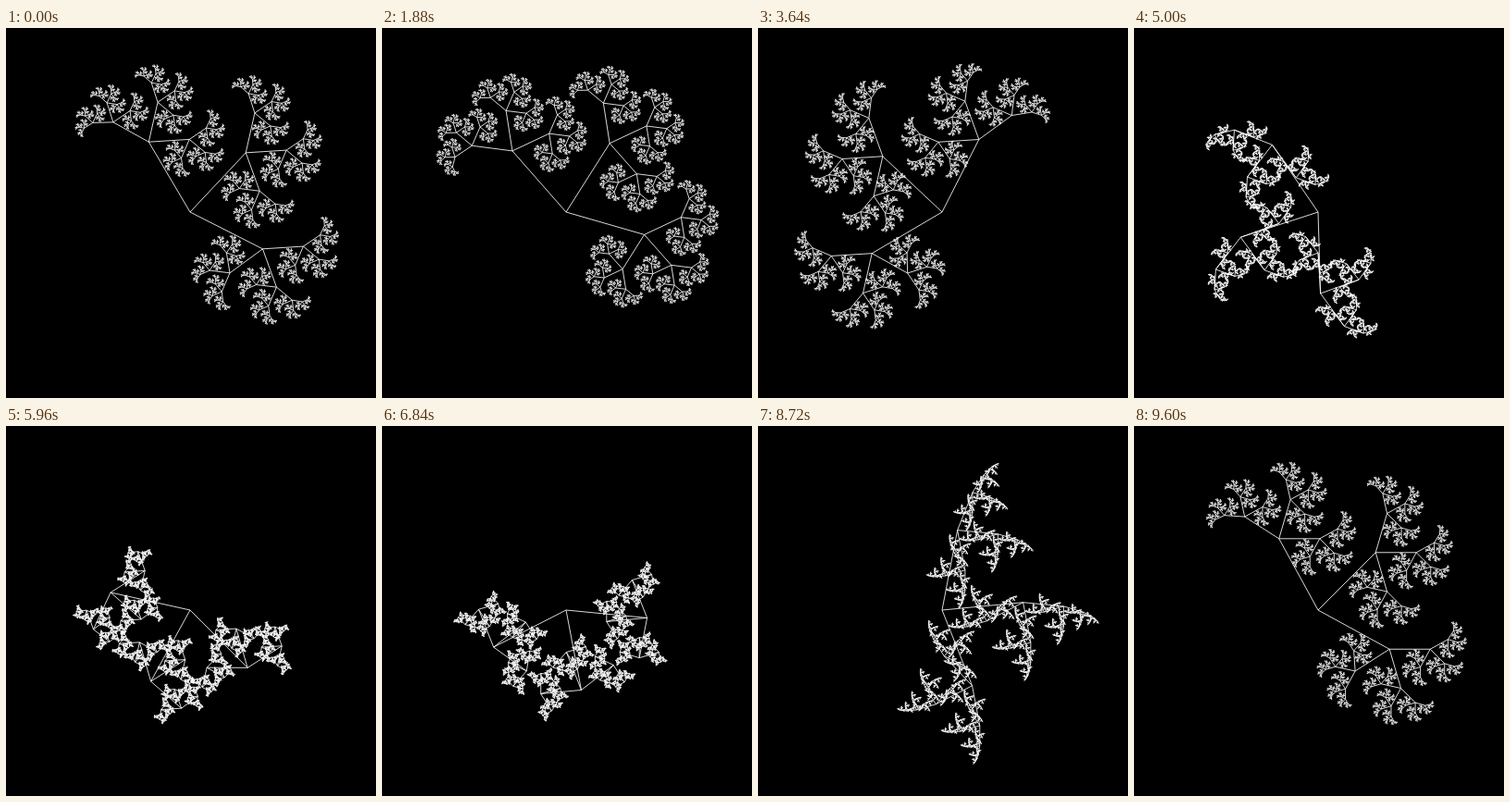
Recreate the animation shown at these times as an HTML page with a canvas. Size 400 by 400 pixels, loop 9.68 s.

```html
<!DOCTYPE html>
<html lang="en">
<head>
<meta charset="utf-8">
<title>Turning fractal tree</title>
<style>
  html, body { margin: 0; width: 100%; height: 100%; overflow: hidden; background: #000; }
  canvas { display: block; }
</style>
</head>
<body>
<canvas id="stage" width="400" height="400"></canvas>
<script>
const ctx = document.getElementById('stage').getContext('2d');
const RAD = Math.PI / 180;
const LOOP = 9680, STEP = 40, FIRST = 41;
const HELD = [126, 241];          // steps that repeat the one before
const ROOT = 199, LENGTH = 88, DEPTH = 8, SPREAD = 73.7;

function turnAt(time) {
  let step = Math.max(FIRST, Math.floor(time / STEP));
  if (HELD.includes(step)) step--;
  return -43.2 + 1.8 * (step - FIRST);
}

// Each node sends out three half-length branches, all turned from its heading.
function grow(levels, x, y, heading, length, turn, depth) {
  if (depth === DEPTH) return;
  for (const side of [-1, 0, 1]) {
    const angle = heading + turn + side * SPREAD;
    const endX = x + length * Math.cos(angle * RAD);
    const endY = y - length * Math.sin(angle * RAD);
    levels[depth].moveTo(x, y);
    levels[depth].lineTo(endX, endY);
    grow(levels, endX, endY, angle, length / 2, turn, depth + 1);
  }
}

function draw(turn) {
  const levels = Array.from({ length: DEPTH }, () => new Path2D());
  grow(levels, ROOT, ROOT, 90, LENGTH, turn, 0);
  ctx.fillStyle = '#000';
  ctx.fillRect(0, 0, 400, 400);
  ctx.strokeStyle = '#fff';
  ctx.lineWidth = 0.85;
  levels.forEach(path => ctx.stroke(path));
}

let shown;
function tick() {
  const turn = turnAt(performance.now() % LOOP);
  if (turn !== shown) draw(shown = turn);
  requestAnimationFrame(tick);
}
tick();
</script>
</body>
</html>
```
